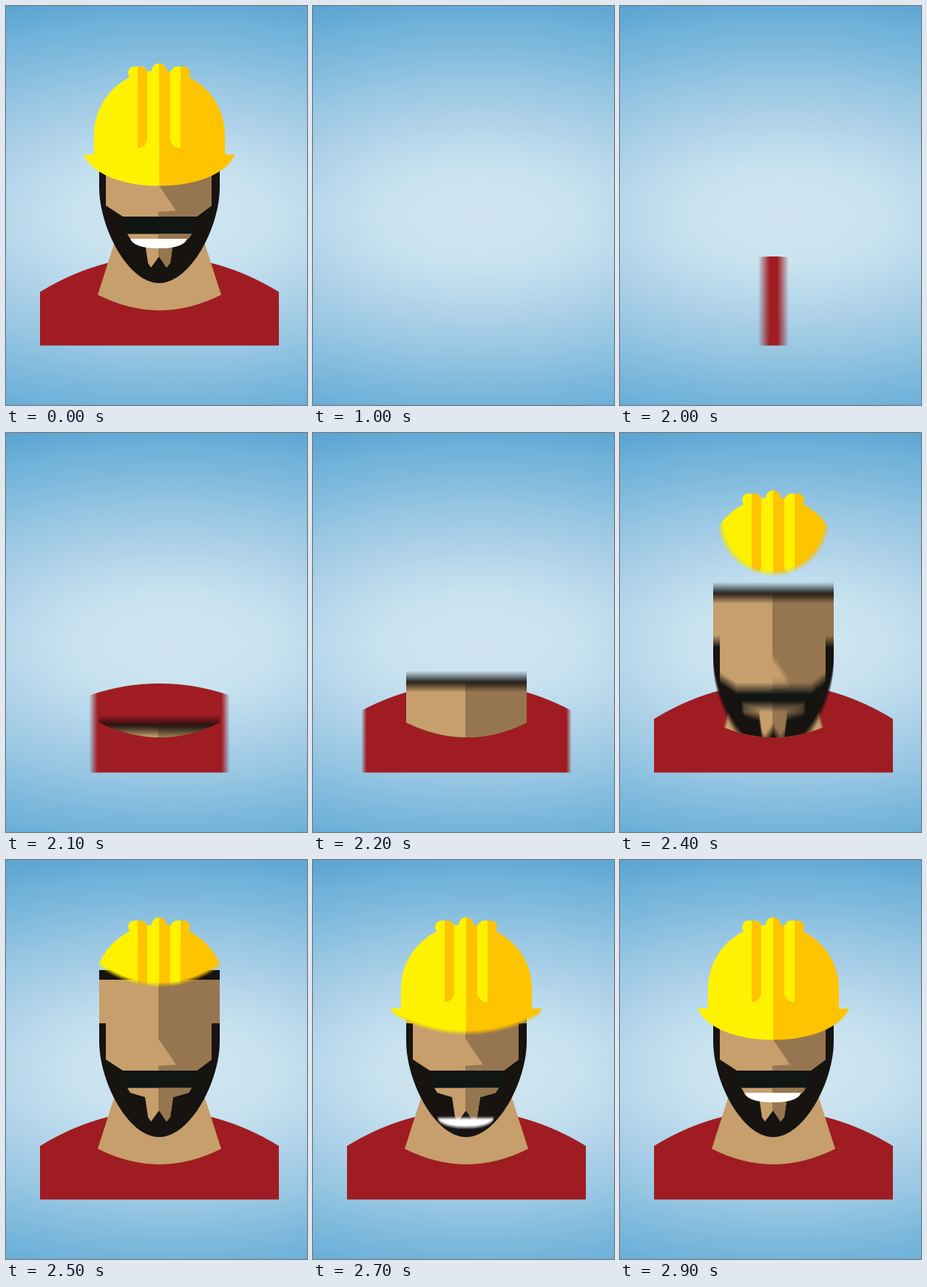
Animation, 407 px wide and 540 px high, one loop 3 s. Source, as an HTML page with a canvas:

```html
<!DOCTYPE html>
<html lang="en">
<head>
<meta charset="utf-8">
<title>Builder</title>
<style>
html, body { margin: 0; width: 100%; height: 100%; overflow: hidden; }
canvas { display: block; }
</style>
</head>
<body>
<canvas id="stage" width="407" height="540"></canvas>
<script>
const W = 407, H = 540, MID = 207, LOOP = 3000, STEP = 100, SAMPLES = 15;
const BLACK = '#161311', SKIN = '#c69f6d', SHADE = '#967650';
const YELLOW = '#fff200', GOLD = '#ffc400', RED = '#9f1d22';

const out = document.getElementById('stage').getContext('2d');
const layer = document.createElement('canvas');
layer.width = W;
layer.height = H;
const g = layer.getContext('2d');

const shape = (d, color) => {
  g.fillStyle = color;
  g.fill(new Path2D(d));
};
const box = (x, y, w, h, color) => {
  g.fillStyle = color;
  g.fillRect(x, y, w, h);
};
const clipped = (path, draw) => {
  g.save();
  g.clip(path);
  draw();
  g.restore();
};
const rect = (x, y, w, h) => {
  const p = new Path2D();
  p.rect(x, y, w, h);
  return p;
};
const circle = (x, y, r) => {
  const p = new Path2D();
  p.arc(x, y, r, 0, Math.PI * 2);
  return p;
};

const sky = g.createRadialGradient(0, 0, 0, 0, 0, 310);
[[0, '#cfe3f1'], [.2, '#cae3ef'], [.26, '#c3dfee'], [.36, '#b7d8ec'],
 [.47, '#a9cee7'], [.6, '#96c6e2'], [.74, '#7fbadd'], [.85, '#70b2d9'],
 [.93, '#63a9d5'], [1, '#5aa2d1']].forEach(([p, c]) => sky.addColorStop(p, c));

function drawSky() {
  g.save();
  g.translate(225, 285);
  g.scale(2, 1);
  box(-W, -H, 2 * W, 2 * H, sky);
  g.restore();
}

function drawShirt(half) {
  clipped(rect(207.5 - half, 300, 2 * half, 200), () =>
    shape('M46 387C150 323 265 323 369 387V459.5H46Z', RED));
}

// Left part light, right part in shadow
function skin(d) {
  shape(d, SKIN);
  clipped(rect(206, 0, W, H), () => shape(d, SHADE));
}

function drawHead(dy) {
  const collar = new Path2D('M124 0V391Q207.5 433 291 391V0Z');
  clipped(collar, () => {
    g.translate(0, dy);
    shape('M148 316L124 391Q207.5 433 291 391L267 316Z', SKIN);
    shape('M126 149H289V245C289 300 249 375 207 375S126 300 126 245Z', BLACK);
    skin('M126 162H289V221H278V270L258 285H158L135 270V221H126Z');
    shape('M205.5 241L230 277L205.5 278.5Z', SKIN);
    box(160, 285, 95, 23, '#101614');
    skin('M164 308.5H251L247 315L226 321L222 348L217 354L207 339L196 354L192 348L188 321L168 315Z');
  });
}

function drawSmile(dy) {
  g.save();
  g.translate(0, dy);
  shape('M168 315H245C241 325 225 328 207 328S172 325 168 315Z', '#fff');
  g.restore();
}

function knob(x, y, w, h, r) {
  const p = new Path2D();
  p.roundRect(x, y, w, h, r);
  return p;
}

function drawHelmet() {
  const body = new Path2D('M105 201H119V174A88.5 87 0 0 1 296 174V201H309.5C299 228 254 243.5 207 243.5S116 228 105 201Z');
  body.addPath(knob(165, 82, 26, 17, 10));
  body.addPath(knob(223, 82, 26, 17, 10));
  body.addPath(knob(197, 77.5, 20, 24, 10));
  clipped(body, () => {
    box(0, 60, MID, 200, YELLOW);
    box(MID, 60, W, 200, GOLD);
    shape('M178 75H191V181Q190 191 178 192.5Z', GOLD);
    shape('M236 75H222V181Q224 191 236 192.5Z', YELLOW);
  });
}

// s counts tenths of a second of the build-up, j is the shutter offset (-.5 to .5)
function helmetMask(s, j) {
  if (s === 3) return [202, Math.max(0, 5 + 10 * j)];
  if (s === 4) return [118, 72 + 8 * j];
  return [34, [135, 172, 200, 225, 225][s - 5] + 6 * j];
}

function drawScene(s, j) {
  drawSky();
  if (s < 0) return;
  const left = Math.max(0, 12.2 - 3.7 * s);
  drawShirt(161.5 - left * left + (s < 4 ? j * (1.5 + 1.1 * left) : 0));
  drawHead(s < 5 ? 301 - 60 * s + 15 * j : 0);
  if (s > 5) drawSmile(s < 9 ? (9 - s) * 17 + 5 * j : 0);
  if (s > 8) drawHelmet();
  else if (s > 2) {
    const [y, r] = helmetMask(s, j);
    g.globalAlpha = s === 3 ? .5 : 1;
    clipped(circle(207.5, y, r), drawHelmet);
    g.globalAlpha = 1;
  }
}

function render(s) {
  const n = s < 0 || s > 8 ? 1 : SAMPLES;
  for (let i = 0; i < n; i++) {
    drawScene(s, n > 1 ? i / (n - 1) - .5 : 0);
    out.globalAlpha = 1 / (i + 1);
    out.drawImage(layer, 0, 0);
  }
}

let shown = null;
const start = performance.now();

function tick() {
  const t = (performance.now() - start) % LOOP;
  const s = t < 1000 ? 9 : t < 2000 ? -1 : Math.floor((t - 2000) / STEP);
  if (s !== shown) render(shown = s);
  requestAnimationFrame(tick);
}
tick();
</script>
</body>
</html>
```
